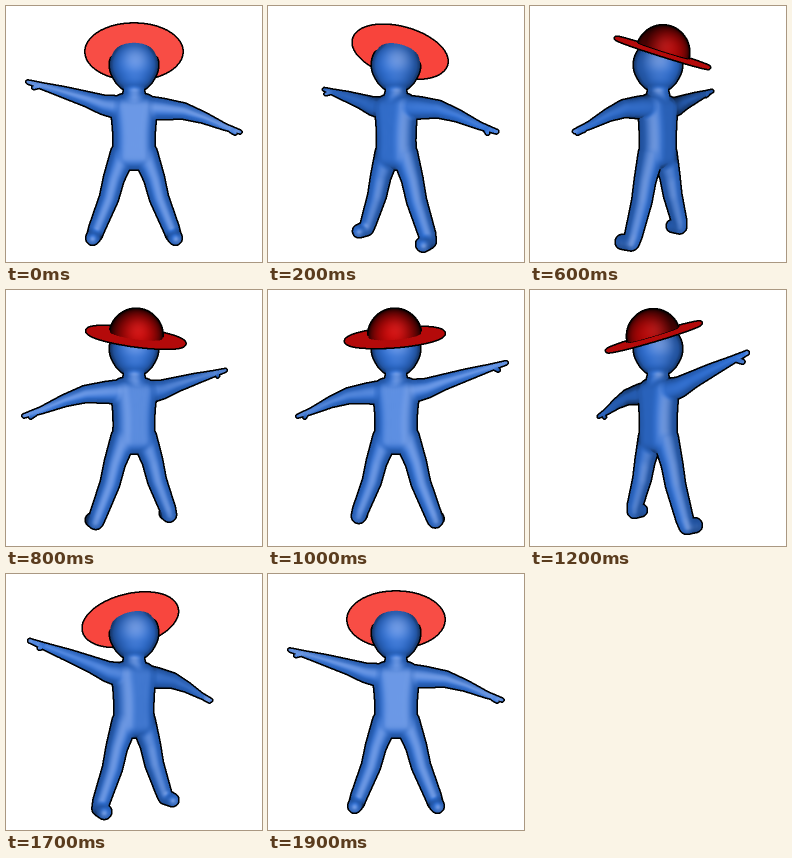
An HTML page with a canvas for the animation above (2000 ms loop, 256 by 256 pixels).

```html
<!DOCTYPE html>
<html lang="en">
<head>
<meta charset="utf-8">
<title>Turning figure</title>
<style>
html, body { margin: 0; width: 100%; height: 100%; overflow: hidden; background: #fff; }
canvas { display: block; width: 100vw; height: 100vh; }
</style>
</head>
<body>
<canvas id="stage" width="256" height="256"></canvas>
<script>
const STEP = 100, FRAMES = 20;
const SIZE = 512, SCALE = 2, CAMERA = 391;
const OUTLINE = 3.6, DEPTH_GAP = 16, SOFTEN = 6, TILT = 22 * Math.PI / 180;
const TURN = [[0, 0], [4, 76], [6, 128], [10, 192], [12, 228], [15, 293], [19, 360]];
const NONE = 0, BODY = 1, CROWN = 2, BRIM = 3;

// Body parts: [x, y, z, radius]; x right, y up, z towards the face.
const leg = s => [[11 * s, -20, 0, 12], [20 * s, -44, 0, 9.8], [25 * s, -64, 0, 9],
  [37 * s, -94, 0, 7.5], [39 * s, -100, 1, 7], [40 * s, -101, 11, 6.2]];
const chains = [
  [[0, 69, 0, 24], [0, 64, 0, 21.5]],
  [[0, 56, 0, 13], [0, 44, 0, 9.5], [0, 33, 0, 12]],
  leg(-1), leg(1),
  [[-12, 26, 0, 11.5], [-30, 29, 0, 9], [-46, 34.5, 0, 7], [-69, 41.5, 0, 5], [-92, 48, 0, 2.6], [-106, 52, 0, 1.4]],
  [[12, 26, 0, 11.5], [28, 25, 0, 10], [49, 23, 0, 7.5], [69, 16.5, 0, 5], [91, 7, 0, 2.6], [106, 2, 0, 1.4]],
  [[-96, 48, 0, 2], [-99, 46, 4, 1.4]],
  [[97, 4, 0, 2], [100, 1, 4, 1.4]]
];
const mix = (a, b, t) => a + (b - a) * t;

function bodySpheres() {
  const list = [];
  for (const chain of chains) {
    for (let i = 1; i < chain.length; i++) {
      const a = chain[i - 1], b = chain[i];
      const n = Math.ceil(Math.hypot(b[0] - a[0], b[1] - a[1], b[2] - a[2]) / 1.2);
      for (let j = 0; j <= n; j++) list.push(a.map((v, k) => mix(v, b[k], j / n)));
    }
  }
  for (let y = -22; y <= 27; y += 1.5) {
    const half = 7 + 2.5 * ((y + 6) / 30) ** 2;
    for (let k = -4; k <= 4; k++) list.push([half * k / 4, y, 0, 13.5]);
  }
  return list;
}
const body = bodySpheres();

const hat = [0, 80.5, -6], HAT_R = 47.5, HOLE_R = 18;
const brimPoint = (u, v) => [u, hat[1] + v * Math.sin(TILT), hat[2] + v * Math.cos(TILT)];
const brim = [];
for (let u = -HAT_R; u <= HAT_R; u += 1.3)
  for (let v = -HAT_R; v <= HAT_R; v += 1.3) {
    const d = Math.hypot(u, v);
    if (d <= HAT_R && d >= HOLE_R) brim.push(brimPoint(u, v));
  }
for (let a = 0; a < 2 * Math.PI; a += .02)
  brim.push(brimPoint(HAT_R * Math.cos(a), HAT_R * Math.sin(a)));

const outlineOffsets = [];
for (let y = -4; y <= 4; y++)
  for (let x = -4; x <= 4; x++)
    if (Math.hypot(x, y) <= OUTLINE) outlineOffsets.push(y * SIZE + x);

// Averages body normals along one axis, without crossing depth edges.
function soften(normals, depth, part, stride) {
  const out = normals.slice();
  for (let at = 0; at < part.length; at++) {
    if (part[at] !== BODY) continue;
    let x = 0, y = 0, z = 0;
    for (let k = -SOFTEN; k <= SOFTEN; k++) {
      const o = at + k * stride;
      if (part[o] !== BODY || Math.abs(depth[o] - depth[at]) > 8) continue;
      x += normals[o * 3];
      y += normals[o * 3 + 1];
      z += normals[o * 3 + 2];
    }
    const length = Math.hypot(x, y, z);
    out.set([x / length, y / length, z / length], at * 3);
  }
  return out;
}

function renderFrame(degrees) {
  const angle = degrees * Math.PI / 180, c = Math.cos(angle), s = Math.sin(angle);
  const view = ([x, y, z]) => [x * c - z * s, y, x * s + z * c];
  const depth = new Float32Array(SIZE * SIZE).fill(2 * CAMERA);
  const part = new Uint8Array(SIZE * SIZE);
  let normals = new Float32Array(SIZE * SIZE * 3);

  function sphere(point, r, kind, keep) {
    const [x, y, z] = view(point), f = SCALE * CAMERA / (CAMERA - z);
    const cx = SIZE / 2 + x * f, cy = SIZE / 2 - y * f, reach = r * f * 1.08 + 1;
    const x1 = Math.min(SIZE - 1, Math.ceil(cx + reach));
    const y1 = Math.min(SIZE - 1, Math.ceil(cy + reach));
    const oz = CAMERA - z, cc = x * x + y * y + oz * oz - r * r;
    for (let j = Math.max(0, Math.floor(cy - reach)); j <= y1; j++) {
      for (let i = Math.max(0, Math.floor(cx - reach)); i <= x1; i++) {
        const dx = (i + .5 - SIZE / 2) / SCALE, dy = (SIZE / 2 - j - .5) / SCALE;
        const a = dx * dx + dy * dy + CAMERA * CAMERA;
        const b = dx * x + dy * y + CAMERA * oz, disc = b * b - a * cc;
        if (disc < 0) continue;
        const t = (b - Math.sqrt(disc)) / a, at = j * SIZE + i;
        if (t * CAMERA >= depth[at]) continue;
        const nx = (dx * t - x) / r, ny = (dy * t - y) / r, nz = (oz - CAMERA * t) / r;
        if (keep && !keep(nx, ny, nz)) continue;
        depth[at] = t * CAMERA;
        part[at] = kind;
        normals[at * 3] = nx;
        normals[at * 3 + 1] = ny;
        normals[at * 3 + 2] = nz;
      }
    }
  }

  const up = view([0, Math.cos(TILT), -Math.sin(TILT)]), centre = view(hat);
  const eye = [-centre[0], -centre[1], CAMERA - centre[2]];
  const open = (up[0] * eye[0] + up[1] * eye[1] + up[2] * eye[2]) / Math.hypot(...eye);
  const brimRed = open < 0 ? [248, 8 - 125 * open, 8 - 110 * open] : [180, 10, 10];

  for (const p of body) sphere(p, p[3], BODY);
  sphere(hat, 26, CROWN, (x, y, z) => x * up[0] + y * up[1] + z * up[2] > 0);
  for (const p of brim) sphere(p, 1.3, BRIM);
  normals = soften(normals, depth, part, 1);
  normals = soften(normals, depth, part, SIZE);

  // Front and back of the figure are lit a little more than its sides.
  function shade(kind, nx, ny, nz, facing) {
    if (kind === BRIM) return brimRed;
    const side = Math.abs(nz * c - nx * s);
    const gloss = Math.max(0, .06 * nx + .03 * ny + .998 * nz);
    if (kind === CROWN) {
      const k = (.1 + .9 * facing) * (.5 + .5 * side), g = gloss ** 12;
      return [195 * k + 20 * g, 6 * k + 18 * g, 6 * k + 18 * g];
    }
    const edge = Math.min(1, .15 + facing * 1.7);
    const k = edge * (.55 + .45 * facing) * (.86 + .14 * side), g = gloss ** 7;
    return [46 * k + 62 * g, 115 * k + 38 * g, 222 * k + 8 * g];
  }

  function outlined(at) {
    for (const offset of outlineOffsets) {
      const o = at + offset;
      if (depth[at] - depth[o] > DEPTH_GAP && !(part[at] === BRIM && part[o] === BRIM)) return true;
    }
    return false;
  }

  const image = new ImageData(SIZE, SIZE), px = image.data;
  for (let at = 0; at < part.length; at++) {
    const line = outlined(at);
    if (part[at] === NONE && !line) continue;
    px[at * 4 + 3] = 255;
    if (line) continue;
    const dx = (at % SIZE + .5 - SIZE / 2) / SCALE;
    const dy = (SIZE / 2 - Math.floor(at / SIZE) - .5) / SCALE;
    const [nx, ny, nz] = normals.subarray(at * 3, at * 3 + 3);
    const facing = (CAMERA * nz - dx * nx - dy * ny) / Math.hypot(dx, dy, CAMERA);
    px.set(shade(part[at], nx, ny, nz, Math.max(0, facing)), at * 4);
  }

  const layer = document.createElement("canvas");
  layer.width = layer.height = SIZE;
  layer.getContext("2d").putImageData(image, 0, 0);
  return layer;
}

function turnAt(step) {
  const i = Math.max(1, TURN.findIndex(key => key[0] >= step));
  const [k0, a0] = TURN[i - 1], [k1, a1] = TURN[i];
  return mix(a0, a1, (step - k0) / (k1 - k0));
}

const ctx = document.getElementById("stage").getContext("2d");
ctx.imageSmoothingQuality = "high";
const cache = [];
let shown = -1;

function draw(now) {
  const step = Math.floor(now / STEP) % FRAMES;
  if (step !== shown) {
    cache[step] ||= renderFrame(turnAt(step) % 360);
    ctx.fillStyle = "#fff";
    ctx.fillRect(0, 0, 256, 256);
    ctx.drawImage(cache[step], 0, 0, 256, 256);
    shown = step;
  }
}
function tick() {
  draw(performance.now());
  requestAnimationFrame(tick);
}
tick();
</script>
</body>
</html>
```
